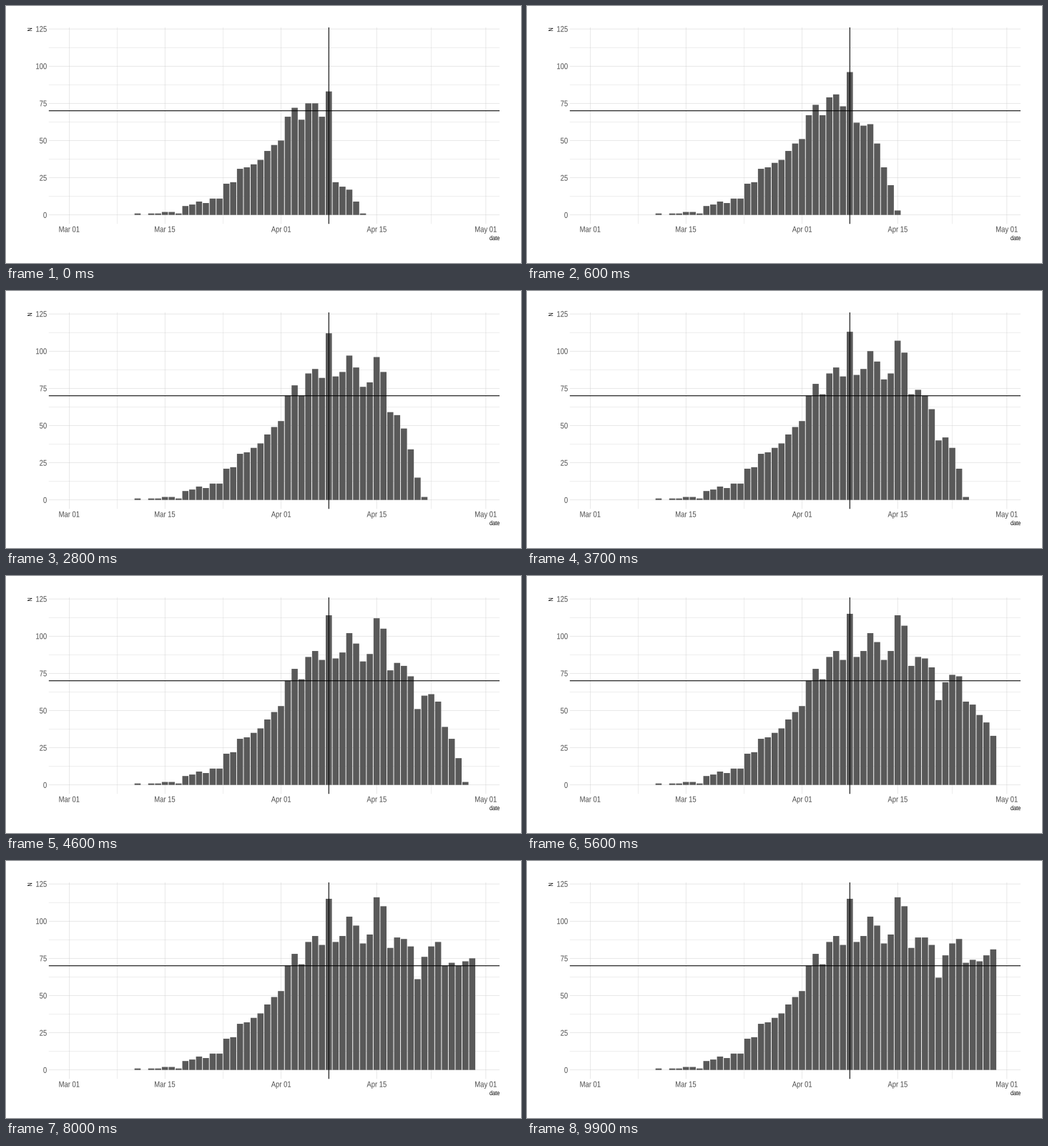
Write a matplotlib script that moves like this. It is 720 px wide and 360 px high and loops after 10000 ms.

```python
import math

import matplotlib.pyplot as plt
from matplotlib.animation import FuncAnimation
from matplotlib.patches import PathPatch, Rectangle
from matplotlib.textpath import TextPath
from matplotlib.transforms import Affine2D

W, H, DPI = 720, 360, 72
LEFT, RIGHT, TOP, BOTTOM = 59.85, 690, 30, 305.2
DAY = (RIGHT - LEFT) / 66
UNIT = (BOTTOM - TOP) / 132
GRID, TEXT = "#cccccc", "#4d4d4d"

# Days count from Mar 01; NEWEST is the last day known at the first step.
FIRST_DAY, NEWEST, MARK_DAY, MARK_COUNT = 10, 43, 38, 70

# Full daily counts, once every report is in.
TOTALS = [1, 0, 1, 1, 2, 2, 1, 6, 7, 9, 8, 11, 11, 21, 22, 31, 32, 35, 38, 44,
          49, 53, 70, 78, 71, 86, 90, 84, 115, 86, 90, 103, 97, 85, 91, 116,
          110, 82, 89, 89, 84, 62, 77, 85, 88, 72, 75, 74, 78, 82]

# Start of each step in tenths of a second; one step brings no news.
STARTS = [(s, 3 * s + (s >= 6) + (s >= 20) + (s >= 27))
          for s in range(33) if s != 27]


def known(day, step):
    """Share of a day's reports in by a step; the first step has a backlog."""
    age = step - (day - NEWEST)
    if age < 0:
        return 0
    share = 1 - math.exp(-0.25 * (age + 0.1))
    return share * (1 - 0.6 * math.exp(-step)) if day > MARK_DAY else share


def px(day):
    return LEFT + (day + 3) * DAY


def py(n):
    return BOTTOM - (n + 6) * UNIT


fig = plt.figure(figsize=(W / DPI, H / DPI), dpi=DPI, facecolor="white")
ax = fig.add_axes([0, 0, 1, 1])
ax.set(xlim=(0, W), ylim=(H, 0))
ax.axis("off")


def line(xs, ys, color, width, z):
    ax.plot(xs, ys, color=color, lw=width, zorder=z, snap=False,
            solid_capstyle="butt")


def hline(n, color, width, z=1):
    line([LEFT, RIGHT], [py(n)] * 2, color, width, z)


def vline(day, color, width, z=1):
    line([px(day)] * 2, [TOP, BOTTOM], color, width, z)


def label(text, x, base, size, color, align, turn=0):
    """Condensed label; align 0, 0.5 or 1 sets the anchor along x."""
    path = TextPath((0, 0), text, size=size, prop={"family": "Liberation Sans"})
    path = path.transformed(Affine2D().scale(0.82, 1).rotate_deg(turn))
    box = path.get_extents()
    move = Affine2D().translate(-box.x0 - align * box.width, 0)
    path = path.transformed(move.scale(1, -1).translate(x, base))
    ax.add_patch(PathPatch(path, fc=color, lw=0, zorder=4))


for n in range(0, 126, 25):
    hline(n, GRID, 0.43)
    label(str(n), 56.8, py(n) + 4.1, 11.5, TEXT, 1)
    if n < 125:
        hline(n + 12.5, GRID, 0.32)

ticks = {"Mar 01": 0, "Mar 15": 14, "Apr 01": 31, "Apr 15": 45, "May 01": 61}
days = list(ticks.values())
for name, d in ticks.items():
    vline(d, GRID, 0.43)
    label(name, px(d), 316.6, 11.5, TEXT, 0.5)
for a, b in zip(days, days[1:]):
    vline((a + b) / 2, GRID, 0.32)

label("date", RIGHT, 328, 9, "black", 1)
label("N", 36.3, 35.6, 9, "black", 1, turn=90)
hline(MARK_COUNT, "black", 1.07, 3)
vline(MARK_DAY, "black", 1.07, 3)

bars = [ax.add_patch(Rectangle((px(d - 0.45), py(0)), 0.9 * DAY, 0,
                               fc="#595959", lw=0, zorder=2, snap=False))
        for d in range(FIRST_DAY, FIRST_DAY + len(TOTALS))]


def draw(i):
    step = max(s for s, start in STARTS if start <= i)
    for d, (bar, total) in enumerate(zip(bars, TOTALS), FIRST_DAY):
        bar.set_height(-round(total * known(d, step)) * UNIT)
    return bars


anim = FuncAnimation(fig, draw, frames=100, interval=100, repeat=True,
                     repeat_delay=0, blit=False)
plt.show()
```
